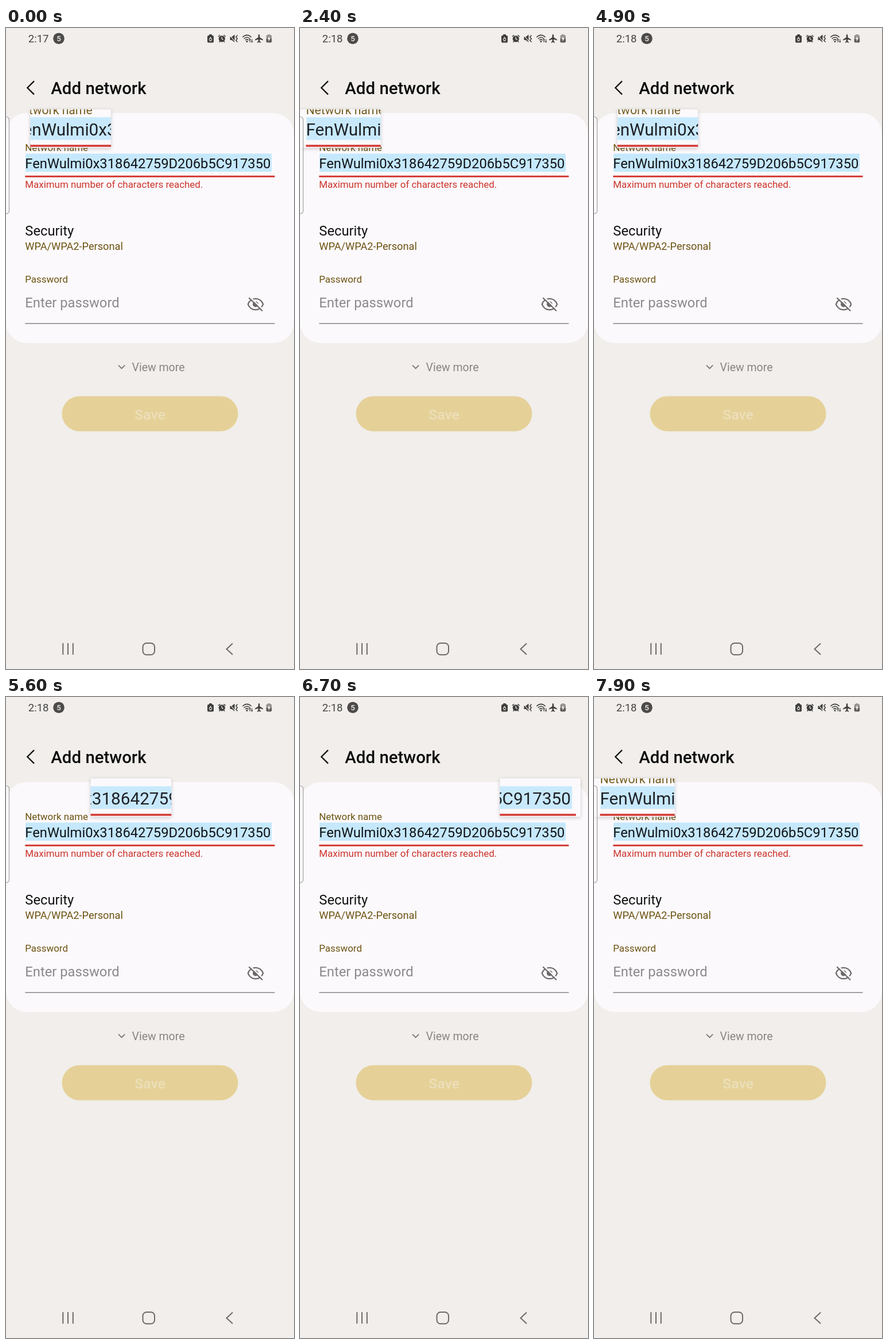
Animation of 502 by 1115 pixels, one loop 8000 ms. Source, as an HTML page with a canvas:

```html
<!DOCTYPE html>
<html lang="en">
<head>
<meta charset="utf-8">
<title>Add network</title>
<style>
  html, body { margin: 0; width: 100%; height: 100%; overflow: hidden; background: #f1eeeb; }
  canvas { display: block; }
</style>
</head>
<body>
<canvas id="stage" width="502" height="1115"></canvas>
<script>
const ctx = document.getElementById('stage').getContext('2d');
const LOOP = 8000, STEP = 100;
const NETWORK = 'FenWulmi0x318642759D206b5C917350';
const PAGE = '#f1eeeb', CARD = '#fbf9fc', GOLD = '#6d5311', RED = '#cc332b', DARK = '#3f3e3d', GREY = '#6c6a69';
const LEFT = 33.3, LARGE = 23.75, SMALL = 16.92;

// Magnifier centre: [time, x]
const PATH = [
  [0, 112.7], [900, 70.3], [4400, 70.3], [4900, 111], [5300, 150], [6200, 353.7],
  [6800, 431.7], [6900, 431.7], [7200, 327.3], [7800, 80], [7900, 70.3], [8000, 70.3]
];
const LOUPE = { y: 141.5, w: 140.6, h: 67, zoom: 1.25, fromY: 236, toY: 177.2 };

function text(str, x, y, size, color, weight = 400, align = 'left') {
  ctx.font = `${weight} ${size}px Roboto, sans-serif`;
  ctx.fillStyle = color;
  ctx.textAlign = align;
  ctx.fillText(str, x, y);
}

function box(x, y, w, h, r, color) {
  ctx.beginPath();
  ctx.roundRect(x, y, w, h, r);
  ctx.fillStyle = color;
  ctx.fill();
}

function disc(x, y, r, color) {
  ctx.beginPath();
  ctx.arc(x, y, r, 0, 2 * Math.PI);
  ctx.fillStyle = color;
  ctx.fill();
}

function stroke(path, color, width) {
  ctx.strokeStyle = color;
  ctx.lineWidth = width;
  ctx.stroke(new Path2D(path));
}

function fill(path, color) {
  ctx.fillStyle = color;
  ctx.fill(new Path2D(path));
}

function loupeCentre(t) {
  const i = PATH.findIndex(([time]) => time > t);
  const [t0, x0] = PATH[i - 1], [t1, x1] = PATH[i];
  return x0 + (x1 - x0) * (t - t0) / (t1 - t0);
}

function drawStatusBar(t) {
  text(t < 1000 ? '2:17' : '2:18', 38.7, 24.6, 18.6, '#454443');
  disc(92, 18.2, 9.8, '#4d4b4a');
  text('5', 92, 23, 13.5, PAGE, 500, 'center');

  // battery care
  box(351, 13, 11, 12.5, 2, DARK);
  box(354, 11, 5, 3, 1, DARK);
  stroke('M354 20.5 L356.5 16.5 L359 20.5 M354.5 22 H358.5', PAGE, 1.3);

  // alarm
  disc(376.3, 18.8, 5.6, DARK);
  stroke('M369.9 15 L373 12.2 M382.7 15 L379.6 12.2 M373 23 L371.5 24.8 M379.6 23 L381.1 24.8', DARK, 1.5);
  stroke('M376.3 15.5 V19 L378.6 20.4', PAGE, 1.3);

  // muted speaker
  fill('M390.5 15.5 H393.5 L398.5 11.5 V25 L393.5 21 H390.5 Z', DARK);
  stroke('M390 12 L400 25', PAGE, 1.2);
  stroke('M403.5 12.5 L400.8 15.5 L403.3 18.5 L400.8 21.5 L403.5 24.5', DARK, 1.5);

  // wifi
  stroke('M412.3 16 Q420 8.8 427.7 16 M414.7 18.8 Q420 13.8 425.3 18.8 M417 21.3 Q420 18.4 423 21.3', DARK, 1.5);
  disc(420, 23.4, 1.5, DARK);
  stroke('M425.3 25 V19.5 M428.7 19.5 V25', DARK, 1.2);
  fill('M423.4 21.2 L425.3 18.6 L427.2 21.2 Z M426.8 23.2 L428.7 25.8 L430.6 23.2 Z', DARK);

  // airplane
  fill('M441 11 Q442.3 11 442.3 13 V16.3 L448 20 V21.6 L442.3 19.8 V23 L444.2 24.5 V25.7 L441 24.8 L437.8 25.7 V24.5 L439.7 23 V19.8 L434 21.6 V20 L439.7 16.3 V13 Q439.7 11 441 11 Z', DARK);

  // battery
  box(456.3, 11, 4, 3, 1, '#999693');
  box(453.7, 12.3, 9.4, 13, 1.8, '#94918e');
  box(453.7, 18, 9.4, 7.3, 1.8, '#5d5b5a');
  fill('M459.3 13.8 L455.6 19.6 H458 L457.3 23.8 L461.2 17.9 H458.7 Z', '#f5f3f0');
}

function drawNetworkField() {
  text('Network name', LEFT, 214, SMALL, GOLD);
  ctx.fillStyle = '#c5e8fc';
  ctx.fillRect(34, 218.5, 429, 31.5);
  text(NETWORK, LEFT, 243.8, LARGE, '#111318');
  ctx.fillStyle = '#d12f28';
  ctx.fillRect(LEFT, 256.8, 435.2, 2.8);
}

function drawEye() {
  stroke('M421.8 480.5 C426.5 467.6 443.5 467.6 448.2 480.5 C443.5 493.4 426.5 493.4 421.8 480.5 Z', GREY, 2.2);
  disc(435, 480.5, 5, GREY);
  stroke('M425.3 468 L449 490.6', CARD, 2.4);
  stroke('M423.3 469.3 L447 492.3', GREY, 2.2);
}

function drawPage() {
  ctx.fillStyle = PAGE;
  ctx.fillRect(0, 0, 502, 1115);
  stroke('M49 92.4 L37.3 104 L49 115.6', '#111', 2.3);
  text('Add network', 78.3, 114.6, 29.4, '#0c0c0c', 500);

  box(0, 148, 502, 400, 36, CARD);
  drawNetworkField();
  text('Maximum number of characters reached.', LEFT, 277.8, SMALL, RED);
  text('Security', LEFT, 360.6, LARGE, '#111');
  text('WPA/WPA2-Personal', LEFT, 386, 18.2, GOLD);
  text('Password', LEFT, 443.2, SMALL, GOLD);
  text('Enter password', LEFT, 486, LARGE, '#8b898b');
  drawEye();
  ctx.fillStyle = '#8d8b8e';
  ctx.fillRect(LEFT, 513.3, 435.2, 1.6);

  stroke('M196 586.7 L201.6 592.2 L207.2 586.7', '#777572', 1.7);
  text('View more', 219.5, 597.2, 19.5, '#888683');
  box(97.5, 640.5, 307, 61, 30.5, '#e5d198');
  text('Save', 251, 681.4, 24.8, '#ecdfba', 500, 'center');
}

function drawNavigation() {
  stroke('M99.3 1070 V1090 M108 1070 V1090 M116.8 1070 V1090', GREY, 2);
  ctx.beginPath();
  ctx.roundRect(238.5, 1070, 20.5, 20.3, 6.5);
  ctx.stroke();
  stroke('M395 1070.5 L384.5 1080.2 L395 1090', GREY, 2);
}

function drawLoupe(centre) {
  const { y, w, h, zoom, fromY, toY } = LOUPE;
  const x = centre - w / 2;
  const source = Math.min(421, Math.max(81.2, centre));
  ctx.save();
  ctx.shadowColor = 'rgba(0,0,0,0.2)';
  ctx.shadowBlur = 6;
  ctx.shadowOffsetY = 1.5;
  box(x, y, w, h, 2.5, CARD);
  ctx.restore();

  ctx.save();
  ctx.beginPath();
  ctx.roundRect(x, y, w, h, 2.5);
  ctx.clip();
  ctx.save();
  ctx.translate(centre, toY);
  ctx.scale(zoom, zoom);
  ctx.translate(-source, -fromY);
  drawNetworkField();
  ctx.restore();
  ctx.fillStyle = 'rgba(255,255,255,0.055)';
  ctx.fillRect(x, y, w, h);
  ctx.restore();
}

function drawEdgeHandle() {
  box(-8, 154.5, 13.5, 168.5, 5, 'rgba(250,249,250,0.6)');
  ctx.strokeStyle = '#a3a1a1';
  ctx.lineWidth = 1.2;
  ctx.stroke();
}

function render(now) {
  const t = Math.floor(now % LOOP / STEP) * STEP;
  drawPage();
  drawStatusBar(t);
  drawNavigation();
  drawLoupe(loupeCentre(t));
  drawEdgeHandle();
}

let start;
function tick(now) {
  start ??= now;
  render(now - start);
  requestAnimationFrame(tick);
}
render(0);
requestAnimationFrame(tick);
</script>
</body>
</html>
```
